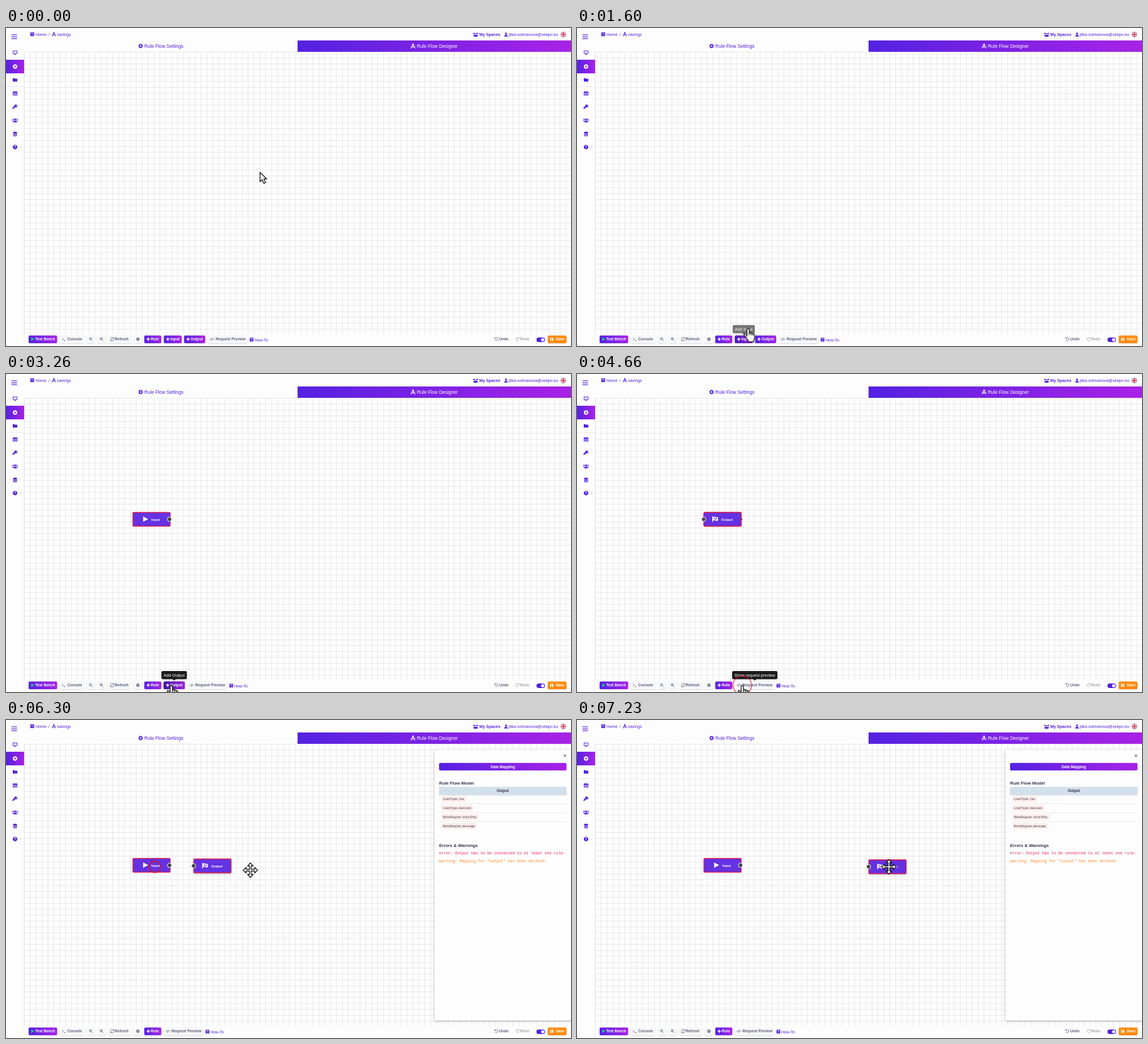
Write an HTML page that moves like this. It is 998x561 px and loops after 8 s.

```html
<!DOCTYPE html>
<html lang="en">
<head>
<meta charset="utf-8">
<title>Rule Flow Designer</title>
<style>
html, body { margin: 0; width: 100%; height: 100%; overflow: hidden; background: #fdfdfd; }
svg { display: block; width: 100%; height: 100%; }
text { font-family: "Liberation Sans", Arial, sans-serif; white-space: pre; }
.mono { font-family: "Liberation Mono", monospace; }

.anim { animation: 8s linear infinite; }
.step { animation: 8s step-end infinite; }

/* pointer */
#pointer { animation-name: travel; }
@keyframes travel {
  0%, 8.95% { transform: translate(448px, 254px); animation-timing-function: cubic-bezier(.65, 0, .35, 1); }
  23.55%, 63.3% { transform: translate(292px, 549px); animation-timing-function: cubic-bezier(.65, 0, .35, 1); }
  72.1%, 73.75% { transform: translate(263px, 259px); animation-timing-function: cubic-bezier(.33, 0, .67, .33); }
  78.75% { transform: translate(431px, 265px); animation-timing-function: cubic-bezier(.22, 1, .36, 1); }
  89%, 100% { transform: translate(551px, 259px); }
}
#arrow { animation-name: arrow; }
@keyframes arrow { 0%, 64.75% { opacity: 1; } 19.5%, 71.1%, 100% { opacity: 0; } }
#hand { animation-name: hand; }
@keyframes hand { 0%, 64.75%, 100% { opacity: 0; } 19.5% { opacity: 1; } }
#move { animation-name: move; }
@keyframes move { 0% { opacity: 0; } 71.1%, 100% { opacity: 1; } }

/* click rings */
.ring { fill: none; stroke: #e0101f; stroke-width: 2; animation: grow 8s linear infinite, fade 8s infinite; }
@keyframes grow { 0% { r: 0; } 15%, 100% { r: 24.5px; } }
@keyframes fade {
  0% { opacity: 1; animation-timing-function: cubic-bezier(.33, 0, .67, .33); }
  15%, 100% { opacity: 0; }
}

/* tooltips and hover states */
.tipInput { animation-name: tipInput; }
@keyframes tipInput { 0%, 18.9% { opacity: 0; } 20.8%, 28.24% { opacity: 1; } 28.25%, 100% { opacity: 0; } }
.tipOutput { animation-name: tipOutput; }
@keyframes tipOutput { 0%, 28.25% { opacity: 0; } 30.1%, 50.74% { opacity: 1; } 50.75%, 100% { opacity: 0; } }
.tipPreview { animation-name: tipPreview; }
@keyframes tipPreview { 0%, 50.75% { opacity: 0; } 52.6%, 64.5% { opacity: 1; } 66.4%, 100% { opacity: 0; } }

/* toolbar reflow */
#addInput { animation-name: addInput; }
@keyframes addInput { 0% { opacity: 1; } 28.25%, 100% { opacity: 0; } }
#addOutput { animation-name: addOutput; }
@keyframes addOutput {
  0% { opacity: 1; transform: none; }
  28.25% { opacity: 1; transform: translateX(-36px); }
  50.75%, 100% { opacity: 0; transform: translateX(-36px); }
}
#rest { animation-name: rest; }
@keyframes rest {
  0% { transform: none; }
  28.25% { transform: translateX(-36px); }
  50.75%, 100% { transform: translateX(-78px); }
}

/* nodes and panel */
#inputNode { animation-name: inputNode; }
@keyframes inputNode { 0% { opacity: 0; } 28.25%, 100% { opacity: 1; } }
#outputNode { animation-name: outputNode; }
@keyframes outputNode { 0% { opacity: 0; } 50.75%, 100% { opacity: 1; } }
#drag { animation-name: drag; }
@keyframes drag {
  0%, 74.4% { transform: none; animation-timing-function: cubic-bezier(.33, 0, .67, .33); }
  78.75% { transform: translate(107px, 1px); animation-timing-function: cubic-bezier(.33, 1, .68, 1); }
  90.4%, 100% { transform: translate(291.3px, 2.5px); }
}
.selected { animation-name: selected; }
@keyframes selected { 0% { opacity: 0; } 74.75%, 100% { opacity: 1; } }
</style>
</head>
<body>
<svg id="stage" viewBox="0 0 998 561" preserveAspectRatio="none"></svg>
<script>
const PURPLE = '#5321dc', GREY = '#5c5f7c', INK = '#33334d';

const gearOutline = 'M' + Array.from({ length: 32 }, (_, i) => {
  const r = i % 4 < 2 ? 8 : 5.8, a = (i + .5) * Math.PI / 16;
  return `${(r * Math.cos(a)).toFixed(1)} ${(r * Math.sin(a)).toFixed(1)}`;
}).join('L') + 'z';

// Icons live in a 16-unit box centred on the origin.
const solid = {
  menu: 'M-8-6.5h16v2h-16zM-8-1h16v2h-16zM-8 4.5h16v2h-16z',
  monitor: 'M-8-7h16v11h-16zM-6-5v7h12v-7zM-4 5.5h8v2h-8z',
  add: 'M0-8a8 8 0 1 0 .01 0zM-1.2-4.5h2.4v3.3h3.3v2.4h-3.3v3.3h-2.4v-3.3h-3.3v-2.4h3.3z',
  folder: 'M-8-6h6l2 2h8v10h-16z',
  table: 'M-8-7h16v14h-16zM-6-2v2.5h5v-2.5zM1-2v2.5h5v-2.5zM-6 2.5v2.5h5v-2.5zM1 2.5v2.5h5v-2.5z',
  key: 'M3-8a5 5 0 1 1-2 9.5l-2 2h-2v2h-2v2h-4v-4l6-6a5 5 0 0 1 4-5.5zM4-5.2a1.4 1.4 0 1 0 .01 0z',
  users: 'M0-6a3 3 0 1 0 .01 0zM-6-5a2 2 0 1 0 .01 0zM6-5a2 2 0 1 0 .01 0zM-5 6v-2a3 3 0 0 1 3-3h4a3 3 0 0 1 3 3v2zM-8 3v-2q0-1 1-1h3q-2 1-2 3zM8 3v-2q0-1-1-1h-3q2 1 2 3z',
  data: 'M-7-5.5a7 2.5 0 0 1 14 0v2a7 2.5 0 0 1-14 0zM-7-1q7 3.5 14 0v2.5a7 2.5 0 0 1-14 0zM-7 4q7 3.5 14 0v1.5a7 2.5 0 0 1-14 0z',
  disc: 'M0-8a8 8 0 1 0 .01 0z',
  archive: 'M-8-7h16v4h-16zM-7-2h14v9h-14zM-3 0v1.5h6v-1.5z',
  compass: 'M0-8a3 3 0 1 0 .01 0zM-2-2l-6 9v1l3-1 5-8 5 8 3 1v-1l-6-9zM-8 0q3 4 6 4.5h4q3-.5 6-4.5l-1.5-1q-6.500 6-13 0z',
  user: 'M0-8a4 4 0 1 0 .01 0zM-7 8v-2a4.500 4.500 0 0 1 4.500-4.500h5a4.500 4.500 0 0 1 4.500 4.500v2z',
  crate: 'M-8-6l8 2 8-2v4l-5 1-3-3-3 3-5-1zM-7 1l4 1 3-3 3 3 4-1v5l-7 2-7-2z',
  gear: gearOutline + 'M0-2.7a2.7 2.7 0 1 0 .01 0z',
  play: 'M-6-7.500L8 0L-6 7.500z',
  plus: 'M-2-7h4v5h5v4h-5v5h-4v-5h-5v-4h5z',
  book: 'M-6-8h13v12h-1v2h1v2h-13q-2 0-2-2v-12q0-2 2-2zM-4-5v1.500h8v-1.500zM-4-2v1.500h8v-1.500zM-5 4.500v1.500h9v-1.500z',
  disk: 'M-7-7h11l3 3v11h-14zM-4.500-5v4h7v-4zM0 1.200a2.300 2.300 0 1 0 .01 0z',
  flag: 'M-8-8h2v16h-2zM-6-6q4-2 7 0t7 0v10q-4 2-7 0t-7 0zM-4-4v3h3v-3zM2-3v3h3v-3zM-1-1v3h3v-3z'
};
const lined = {
  console: 'M-7-5l5 5-5 5M0 6h8',
  zoomOut: 'M-2-7a5 5 0 1 0 .01 0M2 2l5 5M-4-2h4',
  zoomIn: 'M-2-7a5 5 0 1 0 .01 0M2 2l5 5M-4-2h4M-2-4v4',
  refresh: 'M-7-1a7 7 0 0 1 12.500-4M7 1a7 7 0 0 1-12.500 4M7-8v5h-5M-7 8v-5h5',
  code: 'M-4.500-4l-4 4 4 4M4.500-4l4 4-4 4M1.500-6.500l-3 13',
  undo: 'M-5.500-3.500a6.500 6.500 0 1 1 0 7.500M-7-7.500v5h5',
  redo: 'M5.500-3.500a6.500 6.500 0 1 0 0 7.500M7-7.500v5h-5',
  chevron: 'M-2-5l5 5-5 5',
  close: 'M-5-5l10 10M5-5l-10 10'
};

const icon = (name, x, y, size, color) => {
  const paint = solid[name] ? `fill="${color}" fill-rule="evenodd"`
    : `fill="none" stroke="${color}" stroke-width="2.2"`;
  return `<path d="${solid[name] || lined[name]}" ${paint} transform="translate(${x} ${y}) scale(${size / 16})"/>`;
};
const text = (s, x, y, size, color, extra = '') =>
  `<text x="${x}" y="${y}" font-size="${size}" fill="${color}" ${extra}>${s}</text>`;
const bold = (s, x, y, size, color, extra = '') => text(s, x, y, size, color, 'font-weight="700" ' + extra);
const rect = (x, y, w, h, fill, rx = 0, extra = '') =>
  `<rect x="${x}" y="${y}" width="${w}" height="${h}" rx="${rx}" fill="${fill}" ${extra}/>`;
const group = (id, kind, body) => `<g id="${id}" class="${kind}">${body}</g>`;

// Toolbar button: face, hover face, icon and label.
const button = (x, w, iconName, label, { fill = '#f7f8fa', color = GREY, hover = '', iconColor = color } = {}) =>
  rect(x, 542.5, w, 13.5, fill, 2, 'filter="url(#soft)"') +
  (hover && rect(x, 542.5, w, 13.5, 'url(#dark)', 2, `class="anim ${hover}"`)) +
  icon(iconName, label ? x + 7 : x + w / 2, 549, 6.5, iconColor) +
  (label && bold(label, x + (label.length > 10 ? 13.5 : 11.5), 551.2, 6.6, color));
const vivid = { fill: 'url(#brand)', color: '#fff' };

const tooltip = (kind, label, x, w) => `<g class="anim ${kind}">` +
  rect(x, 524, w, 14.500, '#1b1b1b', 2.500) +
  `<path d="M${x + w / 2 - 3} 538h6l-3 3z" fill="#1b1b1b"/>` +
  text(label, x + w / 2, 533.500, 7.3, '#fff', 'text-anchor="middle"') + '</g>';

const node = (iconName, label, iconX, labelX, portX) =>
  rect(224.2, 244.3, 65.800, 24.2, '#6432e2', 1.5, 'stroke="#dc1546" stroke-width="1.4"') +
  icon(iconName, iconX, 256, 10, '#fff') + bold(label, labelX, 258.600, 6.2, '#fff') +
  `<circle cx="${portX}" cy="256.300" r="3.800" fill="#444" stroke="#fff" stroke-width="1"/>`;

const defs = `<defs>
  <linearGradient id="brand"><stop stop-color="#5422e2"/><stop offset="1" stop-color="#a822e6"/></linearGradient>
  <linearGradient id="dark"><stop stop-color="#41169f"/><stop offset="1" stop-color="#a020dc"/></linearGradient>
  <pattern id="grid" x="32" y="42" width="10.4" height="10.4" patternUnits="userSpaceOnUse">
    <path d="M0 .3H10.4M.3 0V10.4" stroke="#d4d4d4" stroke-width=".65"/></pattern>
  <filter id="soft" x="-20%" y="-40%" width="140%" height="200%">
    <feDropShadow dx="0" dy="1" stdDeviation="1" flood-color="#334" flood-opacity=".2"/></filter>
  <filter id="lift" x="-20%" y="-20%" width="140%" height="150%">
    <feDropShadow dx="0" dy="1" stdDeviation="2" flood-opacity=".3"/></filter>
  <clipPath id="badge"><circle cx="984.500" cy="11.500" r="4.800"/></clipPath>
</defs>`;

const sideIcons = [['monitor', 43.5], ['add', 68], ['folder', 91.5], ['table', 115.5],
  ['key', 139], ['users', 163], ['data', 187], ['disc', 210]];
const sidebar = rect(0, 0, 32, 561, '#fdfdfd') +
  '<path d="M32 42V561M0 103.500H32" stroke="#e4e4ea" stroke-width=".8"/>' +
  rect(0, 56, 32, 24, 'url(#brand)') + icon('menu', 14.5, 15.5, 10, PURPLE) +
  sideIcons.map(([name, y]) => icon(name, 16, y, name === 'users' ? 9.5 : 8, name === 'add' ? '#fff' : PURPLE)).join('') +
  bold('?', 16, 212.3, 6.500, '#fff', 'text-anchor="middle"') + icon('chevron', 26, 210, 5, '#aaa');

const header = rect(32, 0, 966, 42, '#fdfdfd') +
  icon('archive', 46.3, 11, 7.5, PURPLE) + text('Home', 52, 13.600, 7.3, PURPLE) +
  text('/', 75, 13.600, 7.3, '#555') +
  icon('compass', 84.5, 11, 7.5, PURPLE) + text('savings', 90, 13.600, 7.3, PURPLE) +
  icon('crate', 829.5, 11.500, 8.5, PURPLE) + bold('My Spaces', 836, 14.200, 7.2, PURPLE) +
  icon('user', 883.2, 11.500, 7, PURPLE) + text('jitka.solmanova@velqor.eu', 888, 14.200, 7.3, PURPLE) +
  `<g clip-path="url(#badge)">${rect(979, 6, 11, 11, '#3c4a9c')}
    <path d="M979 6l11 11M990 6l-11 11" stroke="#fff" stroke-width="2"/>
    <path d="M979 6l11 11M990 6l-11 11" stroke="#d4213d" stroke-width=".7"/>
    <path d="M984.500 6v11M979 11.500h11" stroke="#fff" stroke-width="3"/>
    <path d="M984.500 6v11M979 11.500h11" stroke="#d4213d" stroke-width="1.700"/></g>` +
  icon('gear', 237.8, 31.800, 8.5, PURPLE) + text('Rule Flow Settings', 244.300, 34.800, 8.3, PURPLE) +
  rect(515, 22, 483, 20, 'url(#brand)') +
  icon('compass', 719, 31.800, 8.5, '#fff') + text('Rule Flow Designer', 725.700, 34.800, 8.3, '#fff');

const toolbar = rect(32.5, 540, 966, 21, '#fdfdfd') +
  button(40, 50.3, 'play', 'Test Bench', { ...vivid, iconColor: '#25c68b' }) +
  button(95, 43, 'console', ' Console') +
  button(143, 14, 'zoomOut', '') + button(162, 14, 'zoomIn', '') +
  button(180.5, 40.5, 'refresh', 'Refresh') + button(226, 14, 'gear', '') +
  button(244.3, 30, 'plus', 'Rule', vivid) +
  group('addInput', 'step', button(278.800, 31.500, 'plus', 'Input', { ...vivid, hover: 'tipInput' })) +
  group('addOutput', 'step', button(314.500, 37.300, 'plus', 'Output', { ...vivid, hover: 'tipOutput' })) +
  group('rest', 'step', button(356.800, 69.500, 'code', 'Request Preview') +
    icon('book', 434, 550, 7, PURPLE) + text('How-To', 439, 552.700, 7.1, PURPLE)) +
  icon('undo', 866, 548.800, 6.5, GREY) + bold('Undo', 871, 551.2, 6.6, GREY) +
  icon('redo', 903.5, 548.800, 6.5, '#a5a6b6') + bold('Redo', 908, 551.2, 6.6, '#a5a6b6') +
  rect(937, 546, 15, 8, PURPLE, 4) + '<circle cx="948" cy="550" r="2.800" fill="#fff"/>' +
  rect(957, 542.5, 33, 13.5, '#ff8b0f', 2, 'filter="url(#soft)"') +
  icon('disk', 964, 549, 6.5, '#fff') + bold('Save', 971, 551.2, 6.6, '#fff');

const fields = ['LoanType.tax', 'LoanType.maxLoan', 'RateEngine.totalPay', 'RateEngine.message'];
const panel = rect(757, 52.500, 245, 477.500, '#fdfdfd', 1, 'filter="url(#lift)"') +
  icon('close', 987.3, 63, 7, INK) +
  rect(765, 75.700, 225, 13.300, 'url(#brand)', 2) +
  bold('Data Mapping', 877.500, 84.500, 6.55, '#fff', 'text-anchor="middle"') +
  bold('Rule Flow Model', 765, 114.400, 7.8, INK) +
  rect(765, 118, 225, 13.800, '#d2e0ec', 1, 'filter="url(#soft)"') +
  bold('Output', 877.500, 127, 6.55, INK, 'text-anchor="middle"') +
  fields.map((name, i) => {
    const y = 139.5 + i * 15.800;
    return rect(769, y - 5, name.length * 3.12 + 6, 10.300, '#fdebe8', 2) +
      text(name, 772, y + 1.700, 5.2, '#2b2b38', 'class="mono"') +
      (i < 3 ? rect(765, y + 7.800, 225, .7, '#dfe2e8') : '');
  }).join('') +
  bold('Errors &amp; Warnings', 765, 224.300, 7.78, INK) +
  text('error: Output has to be connected to at least one rule.', 765, 237.400, 6.75, '#ee1c4e', 'class="mono"') +
  text('warning: Mapping for "output" has been deleted.', 765, 251.400, 6.75, '#fb8322', 'class="mono"');

const nodes = group('inputNode', 'step', node('play', 'Input', 246, 256.800, 288.800)) +
  group('outputNode', 'step', group('drag', 'anim',
    rect(224, 244, 66, 25, '#6432e2', 1.5, 'class="step selected" filter="url(#lift)"') +
    node('flag', 'Output', 244, 254.800, 223.800)));

const ring = (x, y, at) => `<circle class="ring" cx="${x}" cy="${y}" style="animation-delay:${at - 8000}ms"/>`;

const arms = [0, 90, 180, 270].map(turn => {
  const c = Math.round(Math.cos(turn * Math.PI / 180)), s = Math.round(Math.sin(turn * Math.PI / 180));
  return [[-1.5, -1.5], [-1.5, -7.5], [-5, -7.5], [0, -12.8], [5, -7.5], [1.5, -7.5]]
    .map(([x, y]) => `${x * c - y * s},${x * s + y * c}`).join(' ');
}).join(' ');
const pointer = group('pointer', 'anim',
  group('arrow', 'step', '<path d="M.7.8V17l3.800-3.500 3 6.700 3-1.300-3-6.600h5z"/>') +
  group('hand', 'step', '<path d="M-2 14V2.500a2 2 0 0 1 4 0V8q2.500-1.300 3.300.8 2.500-1 3.200 1 3-.6 3 2.200v4.500q0 2.500-1.500 4.500v3h-10v-3q-2.500-2-4-5l-3-4.200q-.800-1.800 1-2.300 2-.2 4 4.500zM2 8v4M5.300 9v3.500M8.500 10v3"/>') +
  group('move', 'step', `<polygon points="${arms}"/>`));

document.getElementById('stage').innerHTML = defs +
  rect(0, 0, 998, 561, '#fdfdfd') + rect(32, 42, 966, 498, 'url(#grid)') +
  nodes + sidebar + header + toolbar + `<g class="step selected">${panel}</g>` +
  tooltip('tipInput', 'Add Input', 275, 39) +
  tooltip('tipOutput', 'Add Output', 274.500, 45) +
  tooltip('tipPreview', 'Show request preview', 274, 80) +
  ring(292, 549, 2060) + ring(292, 549, 3860) + ring(263, 259, 5820) +
  `<g fill="#fff" stroke="#111" stroke-width="1.400" stroke-linejoin="round">${pointer}</g>`;
</script>
</body>
</html>
```
